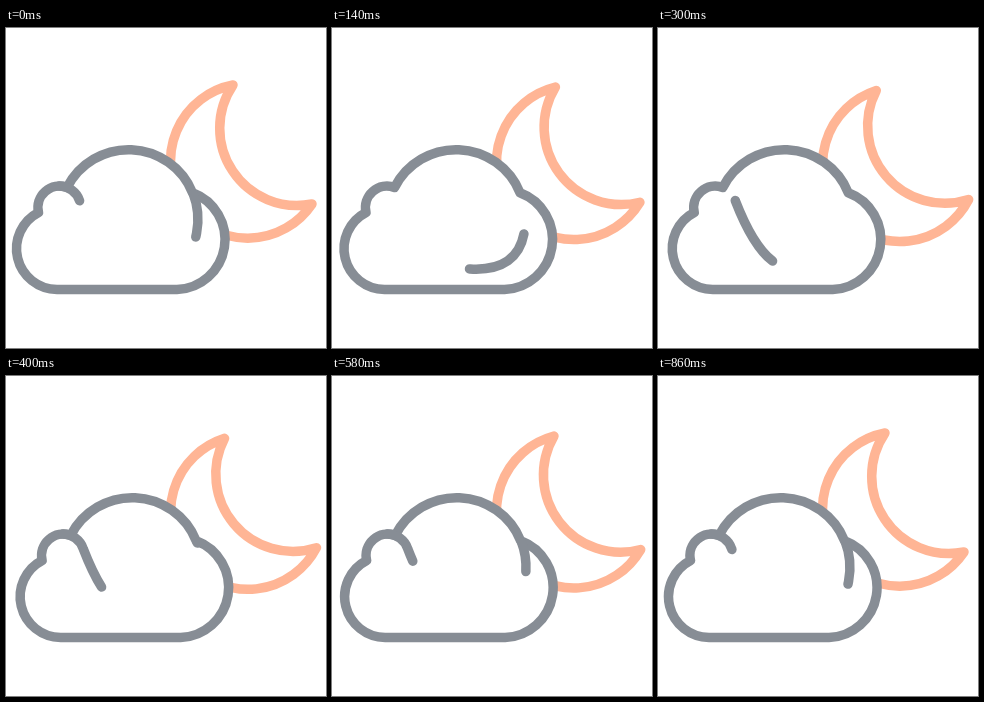
An HTML page that plays this animation: 320 by 320 pixels, repeating every 0.88 s.

```html
<!DOCTYPE html>
<html lang="en">
<head>
<meta charset="utf-8">
<title>Cloudy night</title>
<style>
  html, body { margin: 0; width: 100%; height: 100%; overflow: hidden; background: #fff; }
  svg { display: block; width: 100%; height: 100%; }
  path { fill: none; stroke-width: 9.5; stroke-linecap: round; stroke-linejoin: round; }
  #moon { stroke: #ffb595; }
  #cloud path { stroke: #878d95; }
  #cloud .body { fill: #fff; }
</style>
</head>
<body>
<svg viewBox="0 0 320 320">
  <path id="moon" d="M227 57A77.3 77.3 0 1 0 306 176A77.2 77.2 0 0 1 227 57Z"/>
  <g id="cloud">
    <path class="body" d="M51 261.5A40.8 40.8 0 0 1 32.5 184.5A21.5 21.5 0 0 1 61 159.5A69 69 0 0 1 186.5 164.7A50 50 0 0 1 171 261.5Z"/>
    <path id="wisp" d="M187.3 166C192 178 193 192 190.6 205C186.6 228 170.7 243 136.7 241C128.6 241 118.6 239 111.6 233.7C94.6 221 82.6 196 73.6 172.7A21.5 21.5 0 0 0 53.4 158.1"/>
  </g>
</svg>
<script>
const LOOP = 880, PEAK = 325;
const DASH = 72, PERIOD = 239.5;
// time in ms, position of the wisp's leading end along its path
const KEYS = [[0, 43.5], [140, 112], [300, 211], [480, 256.5], [580, 269.5], [720, 279], [LOOP, 43.5 + PERIOD]];

const moon = document.getElementById('moon');
const cloud = document.getElementById('cloud');
const wisp = document.getElementById('wisp');
wisp.setAttribute('stroke-dasharray', `${DASH} ${PERIOD - DASH}`);

const count = KEYS.length - 1;
const rates = KEYS.slice(1).map(([t, p], i) => (p - KEYS[i][1]) / (t - KEYS[i][0]));

// harmonic mean keeps the curve monotone, also across the loop seam
function slope(i) {
  const a = rates[(i + count - 1) % count], b = rates[i % count];
  return 2 * a * b / (a + b);
}

function headAt(t) {
  let i = 0;
  while (i < count - 1 && t >= KEYS[i + 1][0]) i++;
  const [t0, p0] = KEYS[i], [t1, p1] = KEYS[i + 1];
  const d = t1 - t0, u = (t - t0) / d, v = 1 - u;
  return p0 * v * v * (1 + 2 * u) + p1 * u * u * (3 - 2 * u)
    + d * u * v * (slope(i) * v - slope(i + 1) * u);
}

const ease = x => (1 - Math.cos(Math.PI * x)) / 2;

function draw(t) {
  const sway = t < PEAK ? ease(t / PEAK) : ease((LOOP - t) / (LOOP - PEAK));
  moon.setAttribute('transform', `rotate(${-6.8 * sway} 270 134)`);
  cloud.setAttribute('transform', `translate(${3.8 * sway} 0)`);
  wisp.setAttribute('stroke-dashoffset', DASH - headAt(t));
}

const start = performance.now();
function tick() {
  draw((performance.now() - start) % LOOP);
  requestAnimationFrame(tick);
}
tick();
</script>
</body>
</html>
```
